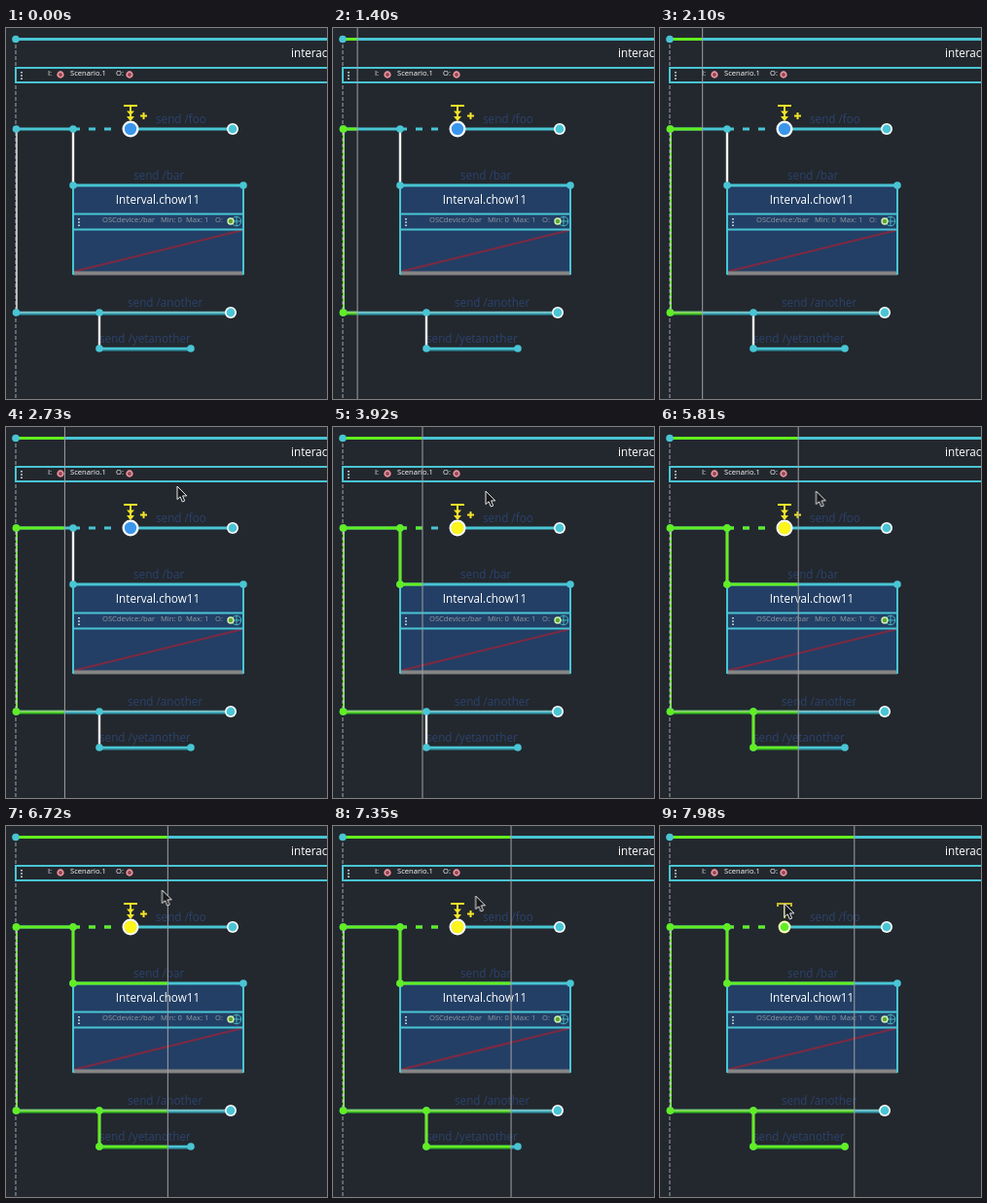
An HTML page that plays this animation: 330 by 382 pixels, repeating every 8000 ms.

```html
<!DOCTYPE html>
<html lang="en">
<head>
<meta charset="utf-8">
<title>Interactive score playback</title>
<style>
  html, body { margin: 0; width: 100%; height: 100%; overflow: hidden; background: #23282e; }
  svg { display: block; width: 330px; height: 382px; }
  text { font-family: "Open Sans", "Noto Sans", sans-serif; font-size: 11.7px; font-weight: 500; fill: #fff; white-space: pre; }
  .label text { fill: #2b426e; font-weight: 400; }
  .small text { font-size: 7.6px; }
  .muted text { fill: #929ba4; font-weight: 400; }
  .cyan { color: #49c5d4; --shade: #27788c; }
  .green { color: #62ee20; --shade: #1f7d0c; }
  .rail { stroke: currentColor; stroke-width: 2.8; fill: none; }
  .shade { stroke: var(--shade); stroke-width: 1.4; }
  .node { fill: currentColor; }
  .link { stroke: #f2f2f2; stroke-width: 2.4; }
  .frame { stroke: #49c5d4; stroke-width: 2; fill: none; }

  .sweep, .cursor, .started, .reach69, .reach96, .reach190, .clicked, .waiting {
    animation: 8s linear infinite;
  }
  .sweep { animation-name: sweep; }
  .cursor { animation-name: cursor; animation-timing-function: ease-in-out; }
  .started, .reach69, .reach96, .reach190, .clicked, .waiting { animation-timing-function: step-end; }
  .started { animation-name: started; }
  .reach69 { animation-name: reach69; }
  .reach96 { animation-name: reach96; }
  .reach190 { animation-name: reach190; }
  .clicked { animation-name: clicked; }
  .waiting { animation-name: waiting; }

  @keyframes sweep { from { transform: translateX(-12.6px); } to { transform: translateX(199.8px); } }
  @keyframes started { 0% { visibility: hidden; } 10.66%, 100% { visibility: visible; } }
  @keyframes reach69 { 0% { visibility: hidden; } 38.5%, 100% { visibility: visible; } }
  @keyframes reach96 { 0% { visibility: hidden; } 51.2%, 100% { visibility: visible; } }
  @keyframes reach190 { 0% { visibility: hidden; } 95.5%, 100% { visibility: visible; } }
  @keyframes clicked { 0% { visibility: hidden; } 98.8%, 100% { visibility: visible; } }
  @keyframes waiting { 0% { visibility: visible; } 98.8%, 100% { visibility: hidden; } }
  @keyframes cursor {
    0%, 29.5% { transform: translate(215px, -25px); }
    33.5%, 35% { transform: translate(176px, 61px); }
    43%, 50% { transform: translate(157px, 66px); }
    56%, 88% { transform: translate(160.5px, 66px); }
    96.5%, 100% { transform: translate(128px, 80px); }
  }
</style>
</head>
<body>
<svg viewBox="0 0 330 382">
  <defs>
    <clipPath id="past"><rect class="sweep" x="-400" width="400" height="382"/></clipPath>
    <g id="rails" class="rail">
      <path class="shade" d="M10 295H231M96 332H190"/>
      <path d="M10 11.5H330M10 104H69M69 162H244M10 293.2H231M96 330.2H190"/>
      <path d="M69 104H116" stroke-dasharray="7 9"/>
    </g>
    <g id="end"><circle r="6" fill="#fff"/><circle class="node" r="4.4"/></g>
    <circle id="port" r="2.8" fill="#8f4a58" stroke="#f0929c" stroke-width="1.7"/>
    <path id="grip" d="M0 0v8" stroke="#d8f4f7" stroke-width="1.6" stroke-dasharray="1.6 1.6"/>
  </defs>

  <path d="M10 11V382" stroke="#a3a6a8" stroke-dasharray="4 2"/>

  <rect class="frame" x="10" y="41" width="340" height="15"/>
  <text x="293" y="30">interac</text>
  <use href="#grip" x="16" y="45"/>
  <g class="small">
    <text x="43" y="48.5">I:</text>
    <text x="66" y="49">Scenario.1</text>
    <text x="113" y="48.5">O:</text>
  </g>
  <use href="#port" x="56" y="48"/>
  <use href="#port" x="127" y="48"/>

  <rect x="69" y="162" width="175" height="92" fill="#233f65"/>
  <path d="M69 251L244 208" stroke="#7d2943" stroke-width="2.2"/>
  <path d="M69 252.5H244" stroke="#858585" stroke-width="4"/>
  <path class="frame" d="M69 162V254M244 162V254M69 191.5H244M69 207.5H244"/>
  <text x="156" y="181" text-anchor="middle">Interval.chow11</text>
  <use href="#grip" x="75" y="196"/>
  <g class="small muted">
    <text x="99" y="199.5">OSCdevice:/bar</text>
    <text x="159" y="199.5">Min: 0</text>
    <text x="185" y="199.5">Max: 1</text>
    <text x="215" y="199.5">O:</text>
  </g>
  <g fill="none" stroke="#43b9bf">
    <circle cx="237" cy="199" r="4.8"/>
    <path d="M232 199h10M237 194v10"/>
  </g>
  <circle cx="231" cy="199" r="3" fill="#5fa832" stroke="#d5efb5" stroke-width="1.4"/>

  <g class="label">
    <text x="154" y="98">send /foo</text>
    <text x="131" y="156">send /bar</text>
    <text x="125" y="287">send /another</text>
    <text x="96" y="324">send /yetanother</text>
  </g>

  <path class="link" d="M11 104V293" style="stroke-width:1.4"/>
  <path class="link" d="M69 104V162M96 293V330"/>

  <g class="cyan">
    <use href="#rails"/>
    <path class="rail" d="M128 104H233"/>
  </g>
  <g class="green" clip-path="url(#past)"><use href="#rails"/></g>
  <path d="M10 292.6H231" stroke="#a5b2b0" stroke-width="1.4" opacity=".7"/>

  <g class="green rail">
    <path class="started" d="M11 104V293" stroke-width="1.5" stroke-dasharray="4 2"/>
    <path class="reach69" d="M69 104V162"/>
    <path class="reach96" d="M96 293V330"/>
  </g>

  <g class="cyan node">
    <circle cx="10" cy="11.5" r="3.8"/>
    <circle cx="10.5" cy="104" r="3.8"/>
    <circle cx="10.5" cy="293" r="3.8"/>
    <circle cx="69" cy="104" r="3.8"/>
    <circle cx="69" cy="162" r="3.8"/>
    <circle cx="244" cy="162" r="3.8"/>
    <circle cx="96" cy="293" r="3.8"/>
    <circle cx="96" cy="330" r="3.8"/>
    <circle cx="190" cy="330" r="3.8"/>
  </g>
  <g class="green node">
    <g class="started"><circle cx="10.5" cy="104" r="3.8"/><circle cx="10.5" cy="293" r="3.8"/></g>
    <g class="reach69"><circle cx="69" cy="104" r="3.8"/><circle cx="69" cy="162" r="3.8"/></g>
    <g class="reach96"><circle cx="96" cy="293" r="3.8"/><circle cx="96" cy="330" r="3.8"/></g>
    <circle class="reach190" cx="190" cy="330" r="3.8"/>
  </g>
  <g class="cyan">
    <use href="#end" x="233" y="104"/>
    <use href="#end" x="231" y="293"/>
  </g>

  <!-- Trigger: idle, armed, then fired by the cursor -->
  <g class="waiting">
    <circle cx="128" cy="104" r="8.5" fill="#fff"/>
    <circle cx="128" cy="104" r="6.2" fill="#3a96ec"/>
    <path d="M121 80H135M128 80V95M138 90.5H145M141.5 87V94" stroke="#f5e529" stroke-width="2"/>
    <path d="M124 85.5H132L128 90ZM124 91H132L128 96Z" fill="#f5e529"/>
  </g>
  <g class="waiting"><circle class="reach69" cx="128" cy="104" r="6.4" fill="#fdf51b"/></g>
  <g class="clicked">
    <path d="M121 83V80H135V83M128 80V95" fill="none" stroke="#c4b72e" stroke-width="2"/>
    <use href="#end" class="green" x="128" y="104"/>
  </g>

  <g class="started"><rect class="sweep" width="1" height="382" fill="#a0a2a4" shape-rendering="crispEdges"/></g>

  <path class="cursor" d="M0 0V13.6L3.1 10.8L5.3 16L7.7 15L5.6 9.9H9.8Z" fill="#17191b" stroke="#e8e8e8"/>
</svg>
</body>
</html>
```
